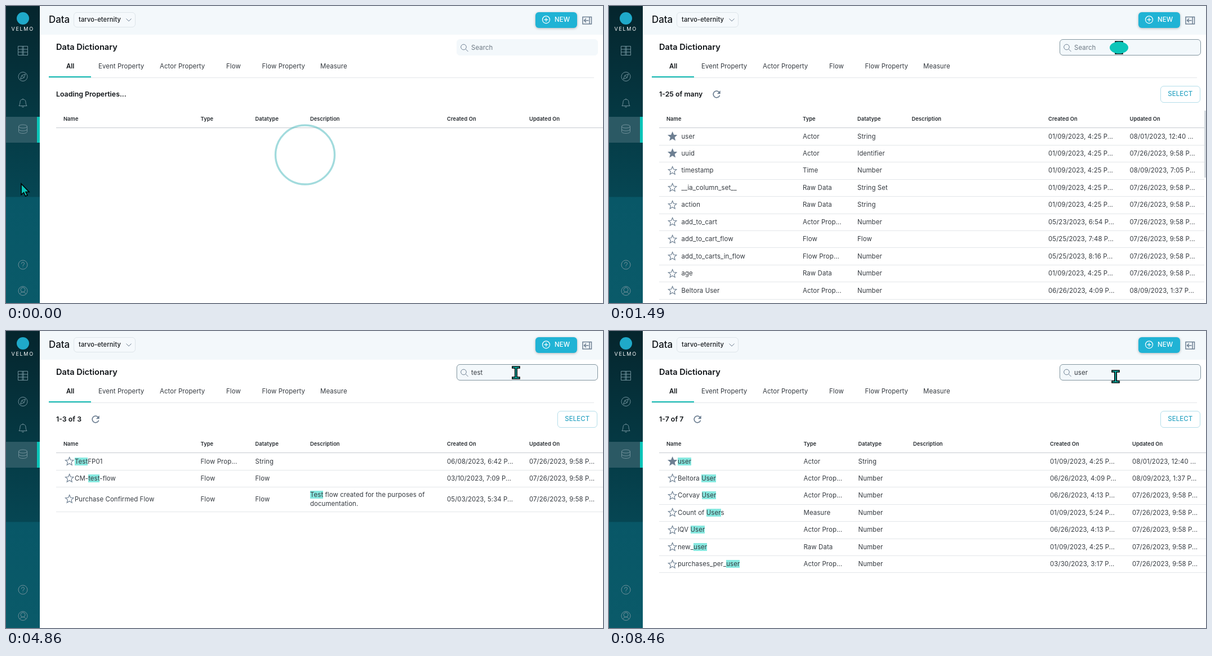
Animation, 1060 px wide and 528 px high, one loop 8560 ms. Source, as an HTML page:

```html
<!DOCTYPE html>
<html lang="en">
<head>
<meta charset="utf-8">
<title>Data Dictionary</title>
<style>
html, body { margin: 0; width: 100%; height: 100%; overflow: hidden; background: #fff; }
body { font: 11.4px/20px Inter, sans-serif; letter-spacing: .1px; color: #353a40; }
#stage { position: relative; width: 1060px; height: 528px; overflow: hidden; }
#stage div, #stage svg, #caret { position: absolute; }
.text { white-space: pre; }
.bold { font-weight: 600; color: #101418; letter-spacing: 0; }
.head { font-weight: 600; font-size: 9.25px; color: #23282d; }
.line { height: 1px; left: 89px; background: #e3e6e9; }
.view, #art { left: 0; top: 0; width: 1060px; height: 528px; }
.button { box-sizing: border-box; border-radius: 6px; text-align: center; font-weight: 500; }
mark { background: #86e8df; color: inherit; }
#side { left: 0; top: 0; width: 60px; height: 528px;
  background: linear-gradient(#05252d, #053c47 230px, #064653 339px, #085767 340px, #0a5a69); }
#active { left: 0; top: 197px; width: 55px; height: 46px; background: #2b5964; border-right: 5px solid #0cc5b9; }
#top { left: 60px; top: 0; width: 1000px; height: 50.5px; background: #f3f8fb; }
#pick { left: 120px; top: 11px; width: 110px; height: 27px; border: 1px solid #dee5ea; background: #f5f9fc; }
#new { left: 940px; top: 11px; width: 74px; height: 28px; background: #20b3d5; box-shadow: 0 1px 4px #0004; }
#field { left: 800px; top: 59px; width: 251px; height: 28.5px; border: 1px solid #f3f8fb; background: #f3f8fb; }
.select { left: 979px; top: 142px; width: 70.5px; height: 29.5px; border: 1px solid #b4deea; color: #2ba4c3; line-height: 27px; }
#caret { width: 1px; height: 14px; margin-top: 3px; background: #222; }
</style>
</head>
<body>
<div id="stage">
  <div id="side"></div><div id="active"></div><div id="top"></div>
  <div id="pick" class="button"></div><div id="new" class="button"></div><div id="field" class="button"></div>
  <div id="labels"></div>
  <div class="text" id="hint" style="left:826px;top:63.5px;color:#6c7883">Search</div>
  <div class="text" style="left:826px;top:63.5px"><span id="query"></span><i id="caret"></i></div>
  <div id="views"></div>
  <svg id="art" viewBox="0 0 1060 528" fill="none">
    <circle cx="30" cy="22" r="11" fill="#1fa9c9"/>
    <g stroke="#70909a">
      <path d="M21.5 71.5h17v16h-17zM21.5 77h17M21.5 82h17M29 71.5v16M31 71.5v16"/>
      <circle cx="30" cy="125.500" r="8"/><path d="M34.500 121l-2.500 6.500-6.500 2.500 2.500-6.500zM28 123.500l4 4"/>
      <path d="M23 177.500q2-2 2-6.500 0-5 5-5t5 5q0 4.500 2 6.500zM30 164.500v1.500M28 179q2 2 4 0"/>
      <ellipse cx="30" cy="214" rx="7.500" ry="3"/>
      <path d="M22.500 214v9.500c0 4 15 4 15 0V214M22.500 219c0 4 15 4 15 0"/>
      <circle cx="30" cy="460" r="8"/>
      <path d="M27.500 458.500q0-3 2.500-3t2.500 2.500q0 1.500-2.500 3v1M30 463.500v1"/>
      <circle cx="30" cy="506.500" r="8"/><circle cx="30" cy="504.500" r="4"/>
      <path d="M24.500 512q1.500-3.500 5.500-3.500t5.500 3.500"/>
    </g>
    <g stroke="#6d7f92">
      <path d="M213.500 22.500l4.500 4.500 4.500-4.500"/>
      <circle cx="812.500" cy="73" r="4.800"/><path d="M816 76.500l4.500 4.500"/>
      <path stroke-width="1.500" d="M1024 19.500h15.500v12.500H1024zM1036 19.500v12.500M1034.500 25.700h-8M1030 22.300l-3.500 3.400 3.500 3.400"/>
    </g>
    <g stroke="#fff" stroke-width="1.200"><circle cx="959" cy="24.300" r="6.500"/><path d="M955.500 24.300h7M959 20.800v7"/></g>
    <g id="rings" stroke-width="3.400"><circle cx="531" cy="264.500" stroke="#46b7bb"/><circle cx="531" cy="264.500" stroke="#1e7a98"/></g>
    <g id="cursor" fill="#0cc5b9" stroke="#000" stroke-width="1.600">
      <path id="arrow" d="M1 1V20.500L5.500 16.500L8.500 23L12 21.500L9 15.500H15Z"/>
      <path id="beam" d="M-6.500-11H6.500V-8H1.700V8H6.500V11H-6.500V8H-1.700V-8H-6.500Z"/>
      <path id="hand" d="M-2 1Q0-2 2 1V10Q5 8 6 11Q8.500 9.500 9.500 12Q12 11 12 14V19Q12 25.500 7 25.500H0Q-3 24-5 20L-8.500 15Q-7 12-4.500 14.500L-2 17ZM2 10V14M6 11V15M9.500 12V16"/>
      <ellipse id="pulse" stroke="none" rx="16.500" ry="10.500"/>
    </g>
  </svg>
</div>
<script>
const LOOP = 8560;
const $ = id => document.getElementById(id);
const text = (x, y, html, cls = '', css = '') =>
  `<div class="text ${cls}" style="left:${x}px;top:${y - 10}px;${css}">${html}</div>`;

$('labels').innerHTML =
  text(9.5, 41.3, 'VELMO', '', 'color:#fff;font-size:9px;letter-spacing:1.7px') +
  text(76, 24.3, 'Data', 'bold', 'font-size:16.9px;font-weight:500') +
  text(129, 24, 'tarvo-eternity', '', 'font-size:11.1px;font-weight:500;color:#15191d') +
  text(974, 24.3, 'NEW', '', 'font-weight:500;color:#fff') +
  text(89, 73.3, 'Data Dictionary', 'bold', 'font-size:14.6px') +
  text(107, 107, 'All', 'bold') +
  [[164, 'Event Property'], [273, 'Actor Property'], [391, 'Flow'], [454.5, 'Flow Property'], [558, 'Measure']]
    .map(([x, name]) => text(x, 107, name)).join('') +
  '<div class="line" style="left:76px;top:127px;width:968px"></div>' +
  '<div style="left:76px;top:125px;width:75px;height:2px;background:#12bab3"></div>';

const starPath = 'M12 17.3L18.2 21l-1.6-7L22 9.200l-7.200-.6L12 2 9.200 8.600 2 9.200 7.500 14 5.800 21z';
const star = (y, full) => `<svg style="left:103.500px;top:${y - 8.5}px" width="17.4" height="17.4" viewBox="0 0 24 24"
  fill="${full ? '#6d7f92' : 'none'}" stroke="#6d7f92" stroke-width="1.6"><path d="${starPath}"/></svg>`;
const refresh = x => `<svg style="left:${x - 10}px;top:147px" width="20" height="20" viewBox="0 0 24 24" fill="none"
  stroke="#6d7f92" stroke-width="2"><path d="M18.700 14a7 7 0 1 1-1.700-7l1.500 1.500"/><path fill="#6d7f92" stroke="none" d="M20 4v7h-7z"/></svg>`;

const wideCols = [345.5, 442.5, 540, 783, 929], narrowCols = [344, 441, 537.5, 780, 924.5];
const CREATED = '01/09/2023, 4:25 P...', UPDATED = '07/26/2023, 9:58 P...';

// Row format: [*]name|type|datatype|created|updated|description lines
function table({ title, icon, rows = [], match, scroll }) {
  const cols = scroll ? narrowCols : wideCols;
  const width = scroll ? 968 : 971;
  const mark = s => match ? s.replace(match, '<mark>$&</mark>') : s;
  const line = (y, css = '') => `<div class="line" style="top:${y}px;width:${width}px;${css}"></div>`;
  let html = text(89, 157, title, 'bold', 'font-size:12.35px') + text(102, 201.3, 'Name', 'head') +
    ['Type', 'Datatype', 'Description', 'Created On', 'Updated On'].map((h, i) => text(cols[i], 201.3, h, 'head')).join('') +
    line(216, 'background:#c5cacf');
  if (icon) html += refresh(icon) + '<div class="button select">SELECT</div>';
  if (scroll) html += '<div style="left:1057px;top:186px;width:3px;height:119px;background:#d3d9de"></div>';
  let top = 216.3;
  for (const row of rows) {
    const [name, type, datatype, created, updated, ...about] = row.split('|');
    const height = about.length ? 43.5 : 30.45, y = top + height / 2;
    html += star(y, name[0] == '*') + text(scroll ? 128.5 : 122, y, mark(name.replace('*', ''))) +
      text(cols[0], y, type) + text(cols[1], y, datatype) +
      text(cols[3], y, created || CREATED) + text(cols[4], y, updated || UPDATED) +
      about.map((s, i) => text(cols[2], y - 8.2 + 16.5 * i, mark(s))).join('');
    top += height;
    html += line(Math.round(top));
  }
  return html;
}

const views = {
  loading: { title: 'Loading Properties...' },
  many: { title: '1-25 of many', icon: 191, scroll: true, rows: [
    '*user|Actor|String||08/01/2023, 12:40 ...', '*uuid|Actor|Identifier||',
    'timestamp|Time|Number||08/09/2023, 7:05 P...', '__ia_column_set__|Raw Data|String Set||',
    'action|Raw Data|String||', 'add_to_cart|Actor Prop...|Number|05/23/2023, 6:54 P...|',
    'add_to_cart_flow|Flow|Flow|05/25/2023, 7:48 P...|',
    'add_to_carts_in_flow|Flow Prop...|Number|05/25/2023, 8:16 P...|', 'age|Raw Data|Number||',
    'Beltora User|Actor Prop...|Number|06/26/2023, 4:09 P...|08/09/2023, 1:37 P...'] },
  test: { title: '1-3 of 3', icon: 159, match: /test/i, rows: [
    'TestFP01|Flow Prop...|String|06/08/2023, 6:42 P...|', 'CM-test-flow|Flow|Flow|03/10/2023, 7:09 P...|',
    'Purchase Confirmed Flow|Flow|Flow|05/03/2023, 5:34 P...||Test flow created for the purposes of|documentation.'] },
  user: { title: '1-7 of 7', icon: 156.5, match: /user/i, rows: [
    '*user|Actor|String||08/01/2023, 12:40 ...',
    'Beltora User|Actor Prop...|Number|06/26/2023, 4:09 P...|08/09/2023, 1:37 P...',
    'Corvay User|Actor Prop...|Number|06/26/2023, 4:13 P...|',
    'Count of Users|Measure|Number|01/09/2023, 5:24 P...|',
    'lQV User|Actor Prop...|Number|06/26/2023, 4:13 P...|', 'new_user|Raw Data|Number||',
    'purchases_per_user|Actor Prop...|Number|03/30/2023, 3:17 P...|'] }
};
$('views').innerHTML = Object.entries(views)
  .map(([id, view]) => `<div class="view" id="${id}">${table(view)}</div>`).join('');

// Timelines of [start, value]
const viewSteps = [[0, 'loading'], [300, 'many'], [3870, 'loading'], [4600, 'test'], [7500, 'loading'], [7950, 'user']];
const ringStarts = [[0, 15], [3870, 3887], [7500, 7547]];
const querySteps = [[0, ''], [2840, 't'], [2930, 'te'], [3010, 'tes'], [3100, 'test'], [5490, 'tes'], [5650, 'te'],
  [5780, 't'], [5920, ''], [6380, 'u'], [6490, 'us'], [6600, 'use'], [6710, 'user']];
const caretSteps = [[0, 0], [1650, 1], [2150, 0], [2660, 1], [3630, 0], [4330, 1], [4860, 0], [5390, 1],
  [7240, 0], [7960, 1], [8300, 0]];
const focusSteps = [[0, 0], [910, 1], [3920, 0], [4640, 1], [7530, 0], [7980, 1]];
const path = [[0, 26, 315], [113, 26, 315], [810, 918, 78], [910, 918, 78], [1340, 905.5, 74], [8270, 905.5, 74], [8460, 899.5, 81]];

const at = (steps, t) => steps.findLast(s => s[0] <= t)[1];
const clamp = u => Math.max(0, Math.min(1, u));
const ease = u => u < .5 ? 4 * u ** 3 : 1 - 4 * (1 - u) ** 3;
const show = (id, on) => $(id).style.display = on ? '' : 'none';

function bezier(x1, y1, x2, y2, x) {
  const curve = (a, b, s) => 3 * (1 - s) ** 2 * s * a + 3 * (1 - s) * s * s * b + s ** 3;
  let low = 0, high = 1;
  for (let i = 0; i < 20; i++) {
    const mid = (low + high) / 2;
    if (curve(x1, x2, mid) < x) low = mid; else high = mid;
  }
  return curve(y1, y2, low);
}

function cursorAt(t) {
  const i = path.findLastIndex(p => p[0] <= t), a = path[i], b = path[i + 1] || a;
  const u = a == b ? 0 : ease((t - a[0]) / (b[0] - a[0]));
  return [a[1] + (b[1] - a[1]) * u, a[2] + (b[2] - a[2]) * u];
}

function draw(t) {
  const view = at(viewSteps, t), loading = view == 'loading';
  for (const id in views) show(id, id == view);

  show('rings', loading);
  const spin = Math.max(0, t - at(ringStarts, t)) / 1000;
  [...$('rings').children].forEach((ring, i) => {
    const u = (spin + (i ? 0 : .5)) % 1;
    ring.setAttribute('r', 81 * bezier(0, .2, .8, 1, u));
    ring.setAttribute('opacity', 1 - bezier(.2, 0, .8, 1, u));
  });

  const query = at(querySteps, t);
  $('query').textContent = query;
  show('hint', !query);
  show('caret', at(caretSteps, t) && !loading);
  $('field').style.borderColor = at(focusSteps, t) ? '#82959f' : '#f3f8fb';

  const [x, y] = cursorAt(t);
  $('cursor').setAttribute('transform', `translate(${x} ${y})`);
  const inField = x > 800 && y > 59 && y < 88;
  const shape = loading ? 'arrow' : inField ? 'beam' : x > 89 && y > 217 ? 'hand' : 'arrow';
  for (const id of ['arrow', 'beam', 'hand']) show(id, id == shape);
  show('pulse', t >= 1490 && t < 1640);
  $('pulse').setAttribute('transform', `scale(${1 - clamp((t - 1510) / 130)})`);
}

function tick() {
  draw(performance.now() % LOOP);
  requestAnimationFrame(tick);
}
tick();
</script>
</body>
</html>
```
